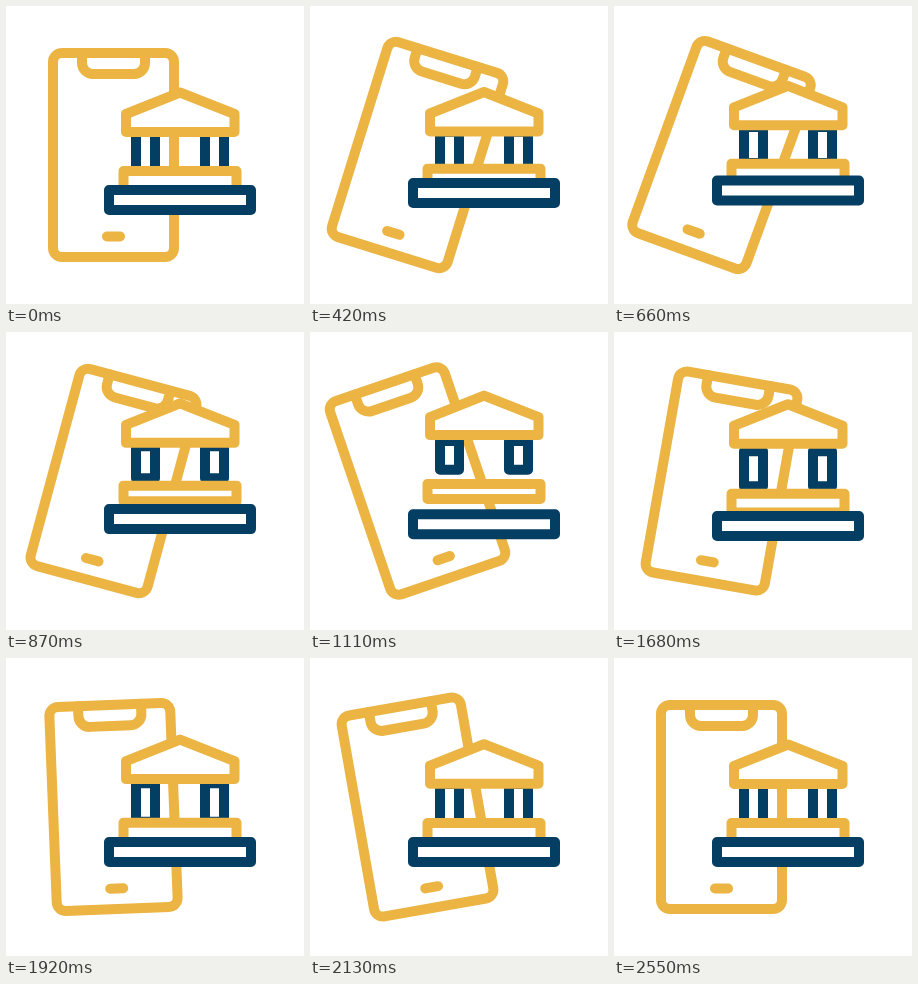
These frames come from a looping animation (298 by 298 pixels, 3 s). An HTML page:

```html
<!DOCTYPE html>
<html lang="en">
<head>
<meta charset="utf-8">
<title>Mobile banking</title>
<style>
  html, body { margin: 0; width: 100%; height: 100%; overflow: hidden; background: #fff; }
  svg { display: block; width: 100%; height: 100%; }
  path, rect { fill: #fff; stroke-width: 10; stroke-linejoin: round; stroke-linecap: round; }
  #phone * { fill: none; }
  .gold { stroke: #ebb443; }
  .navy { stroke: #043e62; }
</style>
</head>
<body>
<svg viewBox="0 0 298 298">
  <g id="phone" class="gold">
    <rect x="47" y="47" width="121" height="204" rx="9"/>
    <path d="M76 47v10a11 11 0 0 0 11 11h41a11 11 0 0 0 11-11v-10"/>
    <path d="M101 230.5h13"/>
  </g>
  <rect class="navy column" x="130" width="19"/>
  <rect class="navy column" x="199" width="19"/>
  <rect id="step" class="gold" x="117.5" width="113"/>
  <path id="roof" class="gold" d="M120 126v-18l54-21.5 54.5 21.5v18z"/>
  <rect id="base" class="navy" x="103" y="184" width="142" height="20"/>
</svg>
<script>
const LOOP = 3000;
const [phone, step, roof, base] = ['phone', 'step', 'roof', 'base'].map(id => document.getElementById(id));
const columns = document.querySelectorAll('.column');

// Smooth rise from 0 to 1 and back, reaching the top at peak
function bump(t, peak, halfWidth) {
  const d = (t - peak) / halfWidth;
  return Math.abs(d) < 1 ? Math.cos(d * Math.PI / 2) ** 2 : 0;
}

const easeInOut = p => p < 0.5 ? 8 * p ** 4 : 1 - 8 * (1 - p) ** 4;

// The phone swings both ways, then again half as far, then rests
const swings = [[0, 0], [660, 20], [1260, -20], [1690, 10], [2125, -10], [2550, 0]];

function phoneAngle(t) {
  const next = swings.findIndex(([time]) => time > t);
  if (next < 0) return 0;
  const [t0, a0] = swings[next - 1], [t1, a1] = swings[next];
  return a0 + (a1 - a0) * easeInOut((t - t0) / (t1 - t0));
}

function setSpan(rect, top, end) {
  rect.setAttribute('y', top);
  rect.setAttribute('height', end - top);
}

// The parts of the bank lift one after another, from the base to the roof
function draw(t) {
  const stepLift = bump(t, 1080, 900), columnLift = bump(t, 1200, 840);
  phone.setAttribute('transform', `rotate(${phoneAngle(t)} 107.5 149)`);
  base.setAttribute('transform', `translate(0 ${-9.5 * bump(t, 645, 645)})`);
  roof.setAttribute('transform', `translate(0 ${-24.5 * bump(t, 1265, 930)})`);
  setSpan(step, 165 - 13 * stepLift, 185 - 18 * stepLift);
  for (const column of columns) setSpan(column, 126 - 17.5 * columnLift, 165 - 28 * columnLift);
}

const start = performance.now();
function tick() {
  draw((performance.now() - start) % LOOP);
  requestAnimationFrame(tick);
}
tick();
</script>
</body>
</html>
```
